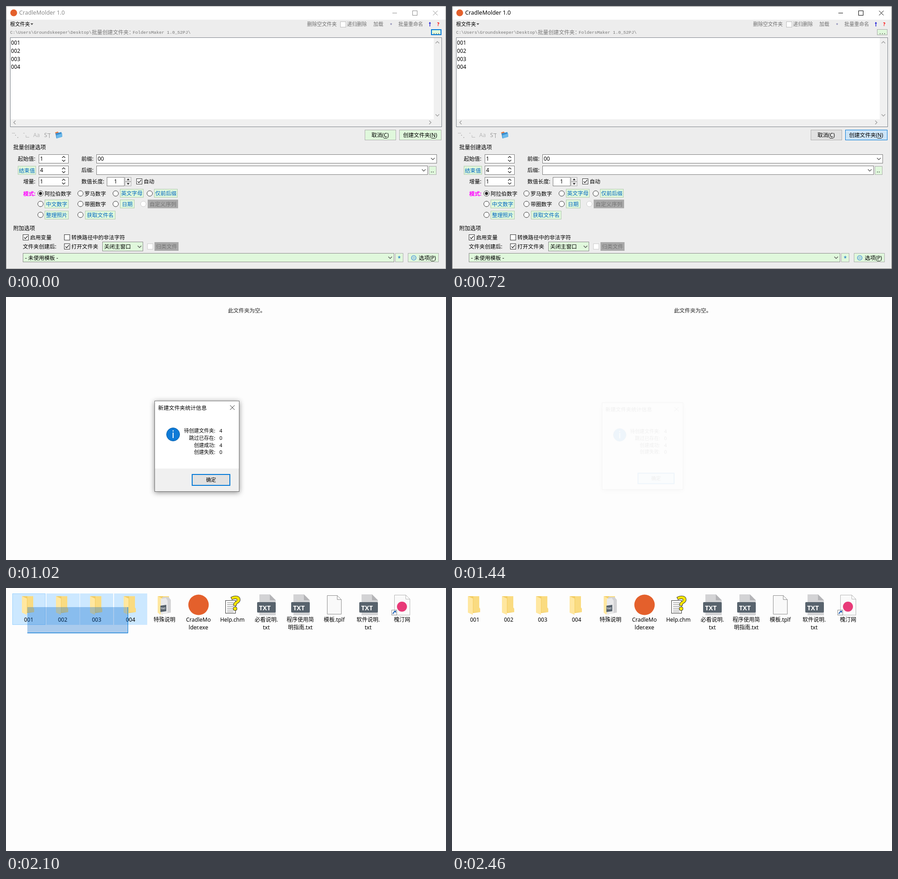
These frames come from a looping animation (969 px wide and 578 px high, 2520 ms). An HTML page with a canvas:

```html
<!DOCTYPE html>
<html lang="zh-CN">
<head>
<meta charset="utf-8">
<title>CradleMolder</title>
<style>
html, body { margin: 0; width: 100%; height: 100%; overflow: hidden; background: #fdfdfd; }
canvas { display: block; width: 969px; height: 578px; }
</style>
</head>
<body>
<canvas id="stage" width="969" height="578"></canvas>
<script>
const W = 969, H = 578, LOOP = 2520, TICK = 60;
const SANS = '"Noto Sans", "Noto Sans CJK SC", "Noto Sans CJK", sans-serif';
const MONO = '"Liberation Mono", "Noto Sans CJK SC", monospace';
const GREEN = '#e0f8dc', BLUE = '#0078d7', LINK = '#0066c0', LOGO = '#e4602c';

const screen = document.getElementById('stage').getContext('2d');
const makeLayer = () => Object.assign(document.createElement('canvas'), { width: W, height: H }).getContext('2d');
const windowLayer = makeLayer(), dialogLayer = makeLayer();
let g = screen;

// Value of the last key that has been reached.
const step = (t, keys) => keys.reduce((v, k) => t >= k[0] ? k[1] : v, keys[0][1]);

// Text is placed by its vertical centre.
function text(s, x, y, { size = 11.8, color = '#000', align = 'left', weight = '', font = SANS } = {}) {
  g.font = `${weight} ${size}px ${font}`;
  g.fillStyle = color;
  g.textAlign = align;
  g.fillText(s, x, y + size * 0.36);
}

function box(x, y, w, h, fill, stroke, line = 1) {
  if (fill) { g.fillStyle = fill; g.fillRect(x, y, w, h); }
  if (stroke) {
    g.strokeStyle = stroke;
    g.lineWidth = line;
    g.strokeRect(x + line / 2, y + line / 2, w - line, h - line);
  }
}

function path(points, { fill, stroke, line = 1, close = !!fill } = {}) {
  g.beginPath();
  points.forEach(([x, y]) => g.lineTo(x, y));
  if (close) g.closePath();
  if (fill) { g.fillStyle = fill; g.fill(); }
  if (stroke) { g.strokeStyle = stroke; g.lineWidth = line; g.stroke(); }
}

function circle(x, y, r, fill, stroke, line = 1) {
  g.beginPath();
  g.arc(x, y, r, 0, 7);
  if (fill) { g.fillStyle = fill; g.fill(); }
  if (stroke) { g.strokeStyle = stroke; g.lineWidth = line; g.stroke(); }
}

function cross(x, y, r, color) {
  path([[x - r, y - r], [x + r, y + r]], { stroke: color });
  path([[x - r, y + r], [x + r, y - r]], { stroke: color });
}

// dir: 0 down, 1 left, 2 up, 3 right
function chevron(x, y, dir = 0, r = 4, color = '#444', line = 1.1) {
  g.save();
  g.translate(x, y);
  g.rotate(dir * Math.PI / 2);
  path([[-r, -r / 2], [0, r / 2], [r, -r / 2]], { stroke: color, line });
  g.restore();
}

function checkbox(x, y, on, label, border = '#333') {
  box(x, y, 13, 13, '#fff', border);
  if (on) path([[x + 3, y + 6.5], [x + 5.5, y + 9.5], [x + 10.5, y + 3.5]], { stroke: '#222', line: 1.3 });
  if (label) text(label, x + 16, y + 7);
}

function radio(x, y, on, border = '#333') {
  circle(x, y, 6, '#fff', border);
  if (on) circle(x, y, 3.4, '#222');
}

function link(label, x, y, w) {
  box(x, y - 9.5, w, 19, GREEN, '#b4c8b0');
  text(label, x + w / 2, y + 0.5, { color: LINK, align: 'center' });
}

function disabledTag(label, x, y, w) {
  box(x, y - 9.5, w, 19, '#a9a9a9');
  text(label, x + w / 2, y + 0.5, { color: '#757575', align: 'center' });
}

function spinner(y, value) {
  box(72, y - 10, 66, 20, '#fff', '#7a7a7a');
  text(value, 75, y);
  chevron(127, y - 4, 2, 3.4, '#222', 1.3);
  chevron(127, y + 4, 0, 3.4, '#222', 1.3);
}

// Centred label whose last bracketed letter is underlined.
function hotkeyLabel(s, cx, y) {
  text(s, cx, y, { align: 'center' });
  const left = cx - g.measureText(s).width / 2;
  const from = left + g.measureText(s.slice(0, -2)).width;
  const to = left + g.measureText(s.slice(0, -1)).width;
  g.fillRect(from, y + 6, to - from, 1);
}

function drawHeader(active) {
  const ink = active ? '#000' : '#8a8a8a', gray = '#707070';
  box(0, 0, W, H, '#ededed');
  box(0, 0, W, 30, '#fff');
  circle(17, 15, 7.5, LOGO);
  text('CradleMolder 1.0', 29, 15, { size: 12.46, color: ink });
  box(851, 15, 10, 1, ink);
  box(895, 10, 11, 11, null, ink);
  cross(945.5, 15.5, 5, ink);

  const small = (s, x, color = gray) => text(s, x, 40, { size: 10.9, color });
  small('根文件夹', 9, '#000');
  path([[54, 38], [60, 38], [57, 42]], { fill: '#555' });
  small('删除空文件夹', 663);
  checkbox(736, 34, false, '', '#bbb');
  small('递归删除', 751);
  small('加载', 809);
  text('+', 848, 40, { size: 9, color: '#4a4a90', align: 'center' });
  small('批量重命名', 864);
  path([[933.5, 45], [933.5, 36]], { stroke: '#1a1ad8', line: 1.4 });
  path([[931, 38.5], [933.5, 35], [936, 38.5]], { fill: '#1a1ad8' });
  text('?', 952, 40, { size: 10, color: '#f00', align: 'center', weight: 'bold' });

  const mono = { size: 9.67, color: '#777', font: MONO };
  text('C:\\Users\\Groundskeeper\\Desktop\\', 9, 58, mono);
  text('批量创建文件夹：', 189, 58, { size: 11.6, color: '#777' });
  text('FoldersMaker 1.0_52PJ\\', 279, 58, mono);
  box(936, 51, 23, 13, GREEN, active ? '#a8a8a8' : BLUE, active ? 1 : 2);
  [942, 947, 952].forEach(x => box(x, 60, 1.4, 1.4, '#222'));
}

function drawList(fading) {
  box(9, 69, 951, 197, '#fff', '#7c828a');
  box(942, 70, 17, 195, '#f0f0f0');
  box(10, 249, 949, 16, '#f0f0f0');
  chevron(950, 80, 2, 4, '#a0a0a0', 1.5);
  chevron(950, 240, 0, 4, '#a0a0a0', 1.5);
  chevron(19, 256, 1, 4, '#a0a0a0', 1.5);
  chevron(934, 256, 3, 4, '#a0a0a0', 1.5);
  for (let i = 0; i < 4; i++)
    text('00' + (i + 1), 11, 81 + i * 17.7, fading ? { color: '#f22', weight: 'bold' } : {});
}

function drawToolbar(s) {
  const faint = '#b9b9b9';
  path([[13, 279.5], [20, 279.5]], { stroke: faint });
  box(20, 283, 2, 2, faint);
  box(25, 288, 2, 2, faint);
  path([[38, 279.5], [41, 279.5]], { stroke: faint });
  path([[44, 284], [44, 288.5], [51, 288.5]], { stroke: faint });
  text('Aa', 60, 284, { color: faint, size: 12 });
  text('S', 84, 284, { color: '#999', size: 12 });
  path([[91, 280.5], [98, 280.5]], { stroke: '#999' });
  path([[95.5, 280], [95.5, 290]], { stroke: '#999' });
  path([[108, 278], [114, 276], [118, 281], [110, 284]], { fill: '#e8793c' });
  path([[109, 280], [122, 277], [124, 287], [111, 291]], { fill: '#3a8fd0' });
  path([[111, 284], [124, 280], [123, 288], [112, 291]], { fill: '#6db9ea' });

  box(790, 272, 69, 23, s.pressed ? '#e1e1e1' : GREEN, '#adadad');
  hotkeyLabel('取消(C)', 824, 284);
  box(866, 272, 93, 23, s.buttonFill, s.buttonBorder);
  hotkeyLabel('创建文件夹(N)', 912, 284);
}

function drawOptions(fieldBorder) {
  text('批量创建选项', 16, 311, { size: 12 });
  text('起始值:', 26, 336);
  link('结束值', 26, 361, 40);
  text('增量:', 38, 386);
  spinner(336, '1');
  spinner(361, '4');
  spinner(386, '1');

  text('前缀:', 166, 336);
  box(199, 326, 750, 20, '#fff', fieldBorder);
  text('00', 202, 336);
  chevron(940, 336);
  text('后缀:', 166, 361);
  box(199, 351, 730, 20, '#fff', '#7a7a7a');
  chevron(920, 361);
  box(931, 352, 17, 19, GREEN, '#adadad');
  [936, 940].forEach(x => box(x, 364, 1.5, 1.5, '#222'));

  text('数值长度:', 166, 386);
  box(222, 376, 39, 20, '#fff', '#7a7a7a');
  text('1', 238, 386);
  [376, 386].forEach(y => box(262, y, 14, 10, '#f0f0f0', '#adadad'));
  path([[266, 383], [272, 383], [269, 379]], { fill: '#333' });
  path([[266, 389], [272, 389], [269, 393]], { fill: '#333' });
  checkbox(287, 379, true, '自动');

  text('模式:', 38, 413, { color: '#f0f', weight: 'bold' });
  [412, 435, 459].forEach((y, row) => {
    radio(76, y, row === 0);
    radio(164, y);
    if (row < 2) radio(241.5, y);
  });
  radio(316.5, 412);
  radio(302.5, 435, false, '#ccc');
  text('阿拉伯数字', 85, 413);
  text('罗马数字', 173, 413);
  link('英文字母', 251, 411.5, 52);
  link('仅前后缀', 326, 411.5, 52);
  link('中文数字', 85, 435, 53);
  text('带圈数字', 173, 436);
  link('日期', 251, 435, 32);
  disabledTag('自定义序列', 312, 435, 67);
  link('整理照片', 85, 459.5, 53);
  link('获取文件名', 174, 459.5, 67);
}

function drawExtras() {
  text('附加选项', 16, 489, { size: 12 });
  checkbox(37, 502, true, '启用变量');
  checkbox(128, 502, false, '转换路径中的非法字符');
  text('文件夹创建后:', 37, 529);
  checkbox(128, 522, true, '打开文件夹');
  box(212, 518, 90, 21, GREEN, '#8a8a8a');
  text('关闭主窗口', 216, 529);
  chevron(294, 529);
  checkbox(311, 522, false, '', '#ccc');
  disabledTag('归类文件', 327, 528.5, 53);
  box(37, 543, 818, 20, GREEN, '#8a8a8a');
  text('- 未使用模板 -', 42, 553.5);
  chevron(846, 553);
  box(857, 543, 18, 20, GREEN, '#adadad');
  text('*', 866, 555, { color: LINK, align: 'center' });
  box(885, 543, 68, 20, GREEN, '#adadad');
  circle(898, 553.5, 5, null, '#5aa0d8', 1.6);
  circle(898, 553.5, 2, null, '#5aa0d8');
  hotkeyLabel('选项(P)', 928, 554);
}

function drawWindow(t) {
  g = windowLayer;
  const pressed = t >= 720;
  drawHeader(pressed);
  drawList(t >= 840);
  drawToolbar({
    pressed,
    buttonFill: step(t, [[0, GREEN], [420, '#e3f4ec'], [480, '#e5f1fb'], [720, '#cce4f7']]),
    buttonBorder: step(t, [[0, '#adadad'], [420, '#5693c2'], [480, BLUE]])
  });
  drawOptions(step(t, [[0, '#7a7a7a'], [120, '#444'], [180, '#171717'], [300, '#7a7a7a']]));
  drawExtras();
  box(0, 0, W, H, null, pressed ? '#666' : '#999');
}

function drawDialog(t) {
  g = dialogLayer;
  g.clearRect(0, 0, W, H);
  box(327, 228, 187, 200, '#fff');
  box(327, 377, 187, 51, '#f0f0f0');
  box(327, 228, 187, 200, null, '#6e6e6e');
  text('新建文件夹统计信息', 335, 244, { size: 11.9 });
  cross(498.5, 243, 5, '#222');
  circle(368, 302, 14.5, '#0f7bd7', '#0a5ea8');
  box(367, 298, 2, 12, '#fff');
  box(367, 293, 2, 2.5, '#fff');
  [['待创建文件夹', 4], ['跳过已存在', 0], ['创建成功', 4], ['创建失败', 0]].forEach(([label, n], i) => {
    const y = 294.5 + i * 15.6;
    text(label + ':', 461, y, { size: 11, align: 'right' });
    text(n, 470, y, { size: 11 });
  });
  const fill = step(t, [[0, '#e1e1e1'], [1140, '#e3e9ee'], [1200, '#e5f1fb'], [1260, '#cce4f7']]);
  box(409, 389, 85, 26, fill, BLUE, 2);
  text('确定', 451.5, 402, { size: 11, align: 'center' });
}

// Draws a layer scaled about a pivot; the shadow falls only outside its frame.
function compose(layer, [alpha, scale], [px, py], frame) {
  screen.save();
  screen.globalAlpha = alpha;
  screen.translate(px, py);
  screen.scale(scale, scale);
  screen.translate(-px, -py);

  screen.save();
  screen.beginPath();
  screen.rect(-W, -H, 3 * W, 3 * H);
  screen.rect(...frame);
  screen.clip('evenodd');
  screen.shadowColor = 'rgba(0,0,0,.45)';
  screen.shadowBlur = 11;
  screen.shadowOffsetY = 2;
  screen.fillStyle = '#fff';
  screen.fillRect(...frame);
  screen.restore();

  screen.drawImage(layer.canvas, 0, 0);
  screen.restore();
}

// Icons are drawn around the x of their label centre.
function folder(x) {
  path([[x - 15, 18], [x + 10, 18], [x + 10, 43], [x + 12, 46], [x + 12, 53], [x - 4, 55], [x - 15, 54]], { fill: '#f3cd62' });
  path([[x - 3, 18], [x + 10, 18], [x + 10, 43], [x + 12, 46], [x + 12, 53], [x - 3, 53]], { fill: '#fadb80' });
  path([[x - 15, 18], [x - 4, 23], [x - 4, 59], [x - 15, 54]], { fill: '#ffe7a0' });
}

function filledFolder(x) {
  folder(x);
  path([[x - 5, 20], [x + 9, 20], [x + 14, 26], [x + 14, 54], [x - 5, 57]], { fill: '#d3d3d5' });
  path([[x - 8, 24], [x + 3, 22], [x + 7, 28], [x + 7, 56], [x - 8, 58]], { fill: '#e9e9ea' });
  path([[x - 10, 39], [x + 4, 37], [x + 4, 51], [x - 10, 53]], { fill: '#58636d' });
  text('TXT', x - 3, 45, { size: 6, color: '#fff', align: 'center', weight: 'bold' });
  path([[x - 15, 18], [x - 9, 22], [x - 9, 59], [x - 15, 54]], { fill: '#ffe7a0' });
}

function page(x, left, right, top, bottom, fold, fill, stroke, foldFill) {
  path([[x + left, top], [x + right - fold, top], [x + right, top + fold], [x + right, bottom], [x + left, bottom]],
    { fill, stroke });
  path([[x + right - fold, top], [x + right - fold, top + fold], [x + right, top + fold]], { fill: foldFill, stroke });
}

function txtFile(x) {
  page(x, -15, 21, 14, 60, 13, '#d3d3d5', null, '#b3b3b6');
  g.beginPath();
  g.roundRect(x - 20, 31, 41, 23, 2);
  g.fillStyle = '#58636d';
  g.fill();
  text('TXT', x - 3, 43.5, { size: 14, color: '#fff', align: 'center', weight: 'bold' });
}

function appFile(x) { circle(x, 37, 22.5, LOGO); }

function helpFile(x) {
  box(x - 16, 27, 23, 29, '#fff', '#333');
  for (let y = 32; y < 54; y += 4) box(x - 12, y, 14, 1, '#777');
  g.font = `900 43px ${SANS}`;
  g.textAlign = 'center';
  g.lineWidth = 2;
  g.strokeStyle = '#333';
  g.strokeText('?', x + 7, 49);
  g.fillStyle = '#fbe600';
  g.fillText('?', x + 7, 49);
}

function blankFile(x) { page(x, -15.5, 15.5, 16.5, 57.5, 9, '#f9f9f9', '#8c8c8c', '#fff'); }

function shortcut(x) {
  page(x, -16.5, 17.5, 15.5, 59.5, 9, '#fafafa', '#b5b5b5', '#fff');
  circle(x, 41, 11, '#e83a78');
  box(x - 23, 48, 12, 12, '#fff', '#888');
  path([[x - 20, 57], [x - 18, 53], [x - 15, 52]], { stroke: '#1f5fb0', line: 2 });
  path([[x - 18, 50], [x - 13, 50], [x - 13, 55]], { fill: '#1f5fb0' });
}

const FILES = [
  [folder, '001'], [folder, '002'], [folder, '003'], [folder, '004'],
  [filledFolder, '特殊说明'], [appFile, 'CradleMo', 'lder.exe'], [helpFile, 'Help.chm'],
  [txtFile, '必看说明.', 'txt'], [txtFile, '程序使用简', '明指南.txt'], [blankFile, '模板.tplf'],
  [txtFile, '软件说明.', 'txt'], [shortcut, '槐汀网']
];

// Moving corner of the marquee; the other corner stays at ANCHOR.
const ANCHOR = [268, 99];
const CORNERS = [[1980, [226, 72]], [2040, [128, 54]], [2100, [47, 42]], [2160, [42, 40]], [2220, [39, 39]]];

function drawMarquee([x, y]) {
  const [right, bottom] = ANCHOR;
  box(x, y, right - x + 1, bottom - y + 1, 'rgba(0,102,204,.33)');
  path([[right + 0.5, y], [right + 0.5, bottom - 0.5], [x, bottom - 0.5]], { stroke: BLUE });
}

function drawFiles(t) {
  const dragging = t >= 1980 && t < 2280;
  const corner = step(t, CORNERS);
  const selecting = t >= 1980 && t < 2460;
  g.globalAlpha = t < 1680 ? 0.5 : 1;
  FILES.forEach(([icon, ...lines], i) => {
    const x = 50 + i * 74.75, left = 14 + i * 74.6;
    if (selecting && i < 4 && left + 73 > corner[0]) {
      const hot = corner[0] < left + 73 && corner[0] > left;
      box(Math.round(left), 12, 73, 69, '#cce8ff', hot ? '#99d1ff' : null);
    }
    icon(Math.round(x));
    lines.forEach((s, k) => text(s, x, 69.5 + k * 17, { size: 12, align: 'center' }));
  });
  g.globalAlpha = 1;
  if (dragging) drawMarquee(corner);
}

function draw(t) {
  g = screen;
  box(0, 0, W, H, '#fdfdfd');
  if (t >= 1620) return drawFiles(t);

  const emptyNote = () => text('此文件夹为空。', 489, 29.5, { color: '#555' });
  emptyNote();
  if (t < 960) {
    drawWindow(t);
    const look = step(t, [[0, [1, 1]], [780, [0.75, 0.985]], [840, [0.28, 0.9645]], [900, [0.08, 0.95]]]);
    compose(windowLayer, look, [452, 281], [0, 0, W, H]);
  }
  if (t >= 840) {
    drawDialog(t);
    const look = step(t, [[840, [0.18, 0.958]], [900, [0.7, 0.985]], [960, [1, 1]],
      [1320, [0.75, 0.985]], [1380, [0.3, 0.967]], [1440, [0.06, 0.958]]]);
    compose(dialogLayer, look, [400, 325], [327, 228, 187, 200]);
  }
  g = screen;
  if (t >= 840) emptyNote();
}

const start = performance.now();
function loop() {
  const t = (performance.now() - start) % LOOP;
  draw(Math.floor(t / TICK) * TICK);
  requestAnimationFrame(loop);
}
loop();
</script>
</body>
</html>
```
